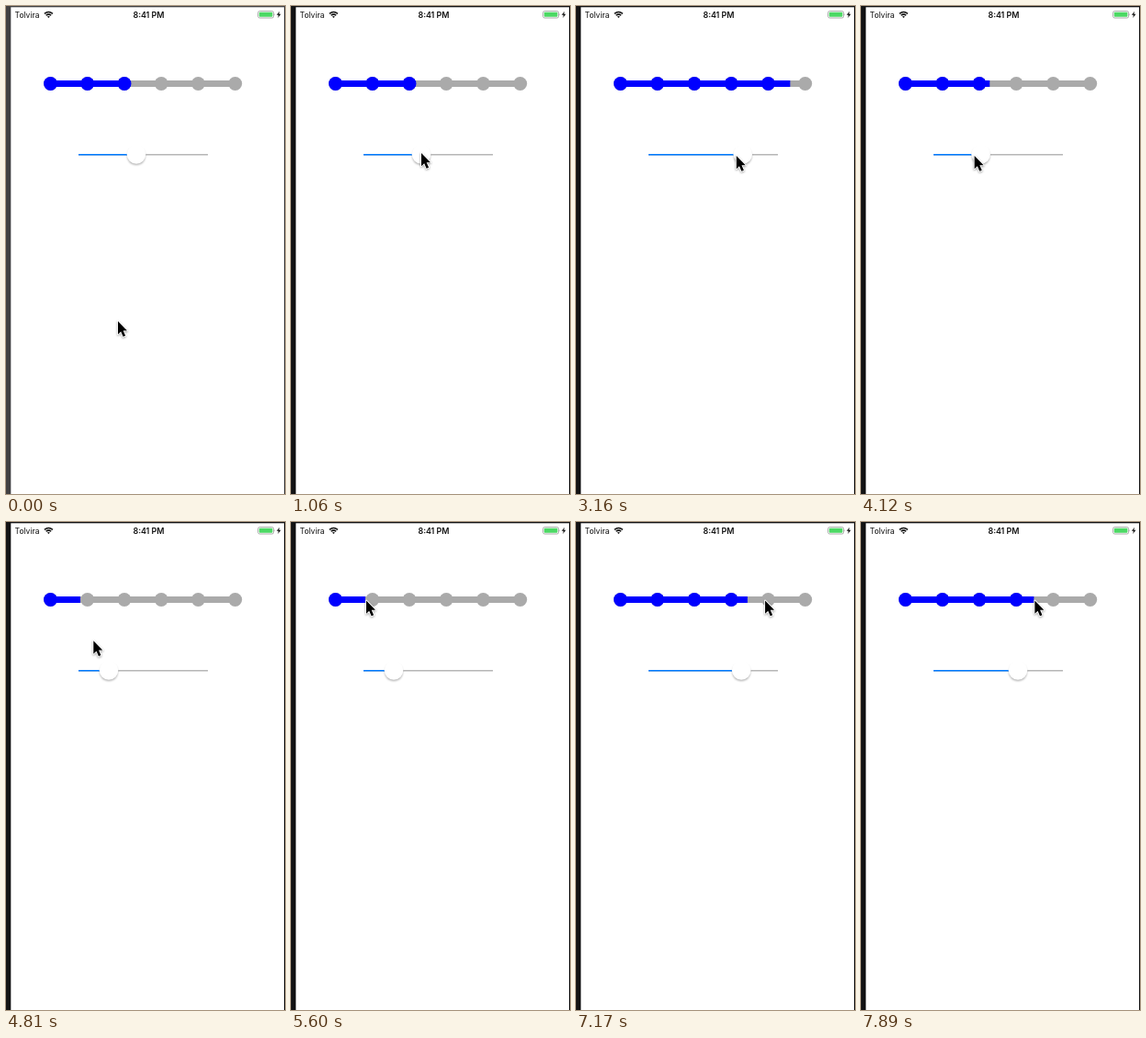
These frames come from a looping animation (304 px wide and 531 px high, 8000 ms). An HTML page:

```html
<!DOCTYPE html>
<html lang="en">
<head>
<meta charset="utf-8">
<title>Step progress and slider</title>
<style>
  html, body { margin: 0; width: 100%; height: 100%; overflow: hidden; background: #fff; }
  svg { display: block; width: 304px; height: 531px; }
  text { font-family: Inter, Roboto, sans-serif; fill: #111; }
  .blue { fill: #00f; }
  .grey { fill: #aaa; }
  #cursor { paint-order: stroke; filter: drop-shadow(0 1px 1px rgba(0, 0, 0, .35)); }
</style>
</head>
<body>
<svg viewBox="0 0 304 531">
  <defs>
    <filter id="soft" x="-50%" y="-50%" width="200%" height="200%">
      <feGaussianBlur stdDeviation="1.2"/>
    </filter>
  </defs>
  <rect id="frame" width="304" height="531"/>
  <rect x="5.3" y="1.3" width="297.7" height="530" fill="#fff"/>

  <!-- status bar -->
  <text x="9.6" y="12.5" font-size="8.5">Tolvira</text>
  <g fill="none" stroke="#111" stroke-width="1.5">
    <path d="M41.9 8.4 Q46.4 4.5 50.9 8.4"/>
    <path d="M43.6 10.3 Q46.4 7.9 49.2 10.3"/>
  </g>
  <path d="M44.9 11.4 Q46.4 10.4 47.9 11.4 L46.4 13z" fill="#111"/>
  <text x="155.5" y="12.6" font-size="8.9" font-weight="600" text-anchor="middle">8:41 PM</text>
  <rect x="274.6" y="5.6" width="17" height="7.4" rx="1.8" fill="#fff" stroke="#999" stroke-width=".8"/>
  <rect x="275.8" y="6.8" width="14.6" height="5" rx=".8" fill="#4cd964"/>
  <path d="M292.5 8 q1.2 1.3 0 2.6z" fill="#999"/>
  <path d="M298 5.8 L294.9 9.8 H296.9 L296.2 13 L299.5 8.7 H297.4z" fill="#111"/>

  <!-- step progress -->
  <rect class="grey" x="48.5" y="81" width="201" height="7"/>
  <g id="dots"></g>
  <rect id="fill" class="blue" x="48.5" y="81" height="7"/>
  <g id="doneDots"></g>

  <!-- slider -->
  <rect x="79" y="161" width="141" height="1.5" fill="#b6b6b6"/>
  <rect id="track" x="79" y="161" height="1.5" fill="#007aff"/>
  <g id="thumb">
    <circle cy="163.3" r="9.8" opacity=".33" filter="url(#soft)"/>
    <circle cy="161.4" r="10.3" fill="#fff"/>
  </g>

  <path id="cursor" d="M0 0 V14.2 L3.2 11.2 L5.6 16.8 L8.1 15.7 L5.7 10.2 H10z"
        stroke="#fff" stroke-width="1.8" stroke-linejoin="round"/>
</svg>
<script>
const LOOP = 8000, STEP = 87.6, LEAD = 247;
// Moments, counted in steps
const ARRIVE = 7, GRAB = 9, RELEASE = 48, REST = 57, GRAB_BAR = 61;
const THUMB_LAG = 1.5, FILL_LAG = 4.5;

// Turning points of the drag: step, slider position
const drag = [
  [GRAB, 142], [17, 189], [22, 207], [26.5, 205], [46.5, 112],
  [61.5, 112], [70.5, 146.5], [76.5, 182], [82.5, 171]
];

const $ = id => document.getElementById(id);
const mix = (a, b, p) => a + (b - a) * p;
const progress = (k, from, to) => Math.min(1, Math.max(0, (k - from) / (to - from)));
const easeInOut = p => p * p * (3 - 2 * p);
const easeOutBack = p => 1 + 3.2 * (p - 1) ** 3 + 2.2 * (p - 1) ** 2;
const dotX = i => 48.5 + 40.24 * i;
const toBar = x => 81 + (x - 112) * 1.82;

function hand(k) {
  let x = drag[0][1];
  for (let i = 1; i < drag.length; i++) {
    x = mix(x, drag[i][1], progress(k, drag[i - 1][0], drag[i][0]));
  }
  return x;
}

function pointer(k) {
  if (k < GRAB) {
    const p = progress(k, -1, ARRIVE);
    return [mix(122, 141, easeInOut(p)), mix(343, 160, easeOutBack(p))];
  }
  if (k < RELEASE) return [hand(k), mix(160, 163, progress(k, GRAB, 30))];
  if (k < GRAB_BAR) {
    const p = easeInOut(progress(k, RELEASE, REST));
    return [mix(112, 72, p), mix(163, 82, p)];
  }
  return [toBar(hand(k - THUMB_LAG)) + 1, 85.5];
}

function addDots(group, cls) {
  return Array.from({ length: 6 }, (_, i) => {
    const dot = document.createElementNS("http://www.w3.org/2000/svg", "circle");
    const attrs = { class: cls, cx: dotX(i), cy: 84.5, r: 7.5 };
    for (const name in attrs) dot.setAttribute(name, attrs[name]);
    return group.appendChild(dot);
  });
}
addDots($("dots"), "grey");
const doneDots = addDots($("doneDots"), "blue");

function draw(time) {
  const k = Math.floor((time % LOOP - LEAD) / STEP);
  const thumb = hand(k - THUMB_LAG);
  const fill = toBar(hand(k - FILL_LAG));
  const [x, y] = pointer(k);
  $("frame").setAttribute("fill", k < GRAB ? "#414143" : "#131314");
  $("cursor").setAttribute("transform", `translate(${x} ${y})`);
  $("thumb").setAttribute("transform", `translate(${thumb} 0)`);
  $("track").setAttribute("width", thumb - 79);
  $("fill").setAttribute("width", fill - 48.5);
  doneDots.forEach((dot, i) => dot.setAttribute("visibility", fill > dotX(i) + 1 ? "visible" : "hidden"));
}

const start = performance.now();
function tick() {
  draw(performance.now() - start);
  requestAnimationFrame(tick);
}
tick();
</script>
</body>
</html>
```
